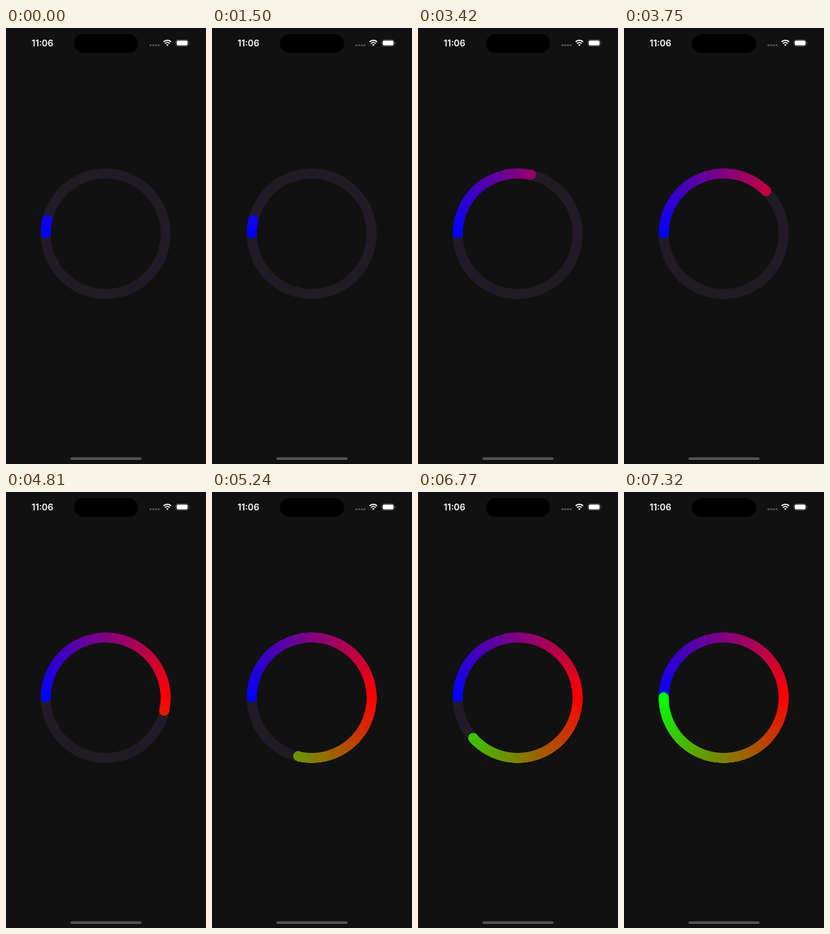
An HTML page that plays this animation: 295 px wide and 640 px high, repeating every 8530 ms.

```html
<!DOCTYPE html>
<html lang="en">
<head>
<meta charset="utf-8">
<title>Gradient progress ring</title>
<style>
  @property --p {
    syntax: "<number>";
    inherits: true;
    initial-value: 0.0357;
  }
  html, body {
    margin: 0;
    width: 100%;
    height: 100%;
    overflow: hidden;
    background: #111;
  }
  .stage {
    position: relative;
    width: 295px;
    height: 640px;
    overflow: hidden;
    background: #111;
  }
  .chrome {
    position: absolute;
    inset: 0;
  }
  .ring {
    position: absolute;
    left: 51px;
    top: 205.5px;
    width: 192px;
    height: 192px;
    --band: radial-gradient(circle closest-side, #0000 80.5px, #000 81.5px 95.5px, #0000 96px);
    animation: fill 8.53s cubic-bezier(.37, 0, .63, 1) infinite;
  }
  .track, .arc {
    position: absolute;
    inset: 0;
  }
  .track {
    background: #211b25;
    mask: var(--band);
  }
  .arc {
    background: conic-gradient(from 270deg, #00f, #f00, #0f0);
    mask: var(--band), conic-gradient(from 270deg, #000 calc(var(--p) * 100%), #0000 0);
    mask-composite: intersect;
  }
  .cap {
    position: absolute;
    left: 0;
    top: 88.5px;
    width: 15px;
    height: 15px;
    border-radius: 50%;
    background: #00f;
    transform-origin: 96px 7.5px;
  }
  .head {
    transform: rotate(calc(var(--p) * 360deg));
    background: rgb(
      calc(255 * min(2 * var(--p), 2 - 2 * var(--p)))
      calc(255 * max(0, 2 * var(--p) - 1))
      calc(255 * max(0, 1 - 2 * var(--p))));
  }
  /* quarter steps, the last one clipped at full */
  @keyframes fill {
    0%, 24.15% { --p: 0.0357; }
    27.67%, 42.53% { --p: 0.2857; }
    46.05%, 57.21% { --p: 0.5357; }
    60.73%, 77.73% { --p: 0.7857; }
    81.24%, 100% { --p: 1; }
  }
</style>
</head>
<body>
<div class="stage">
  <svg class="chrome" width="295" height="640" viewBox="0 0 295 640">
    <text x="53.7" y="26.6" fill="#fff" font-family="Inter, sans-serif" font-size="13" font-weight="600" text-anchor="middle">11:06</text>
    <rect x="100.5" y="9" width="94" height="27.5" rx="13.75" fill="#000"/>
    <g fill="#555">
      <circle cx="213" cy="25.3" r="1.5"/>
      <circle cx="217" cy="25.3" r="1.5"/>
      <circle cx="221" cy="25.3" r="1.5"/>
      <circle cx="225" cy="25.3" r="1.5"/>
    </g>
    <g fill="none" stroke="#fff" stroke-width="1.8">
      <path d="M232.5 20.4a7.9 7.9 0 0 1 11 0"/>
      <path d="M234.6 22.8a4.9 4.9 0 0 1 6.8 0"/>
    </g>
    <path d="M236.2 24.6a2.7 2.7 0 0 1 3.6 0l-1.8 2z" fill="#fff"/>
    <rect x="250.5" y="17.5" width="18.5" height="9" rx="3" fill="none" stroke="#666" stroke-width=".8"/>
    <rect x="251.8" y="18.6" width="16" height="6.8" rx="2" fill="#fff"/>
    <path d="M270 20.5q1.5 1.5 0 3z" fill="#666"/>
    <text x="148" y="432" fill="#14141f" font-family="Inter, sans-serif" font-size="11.5" text-anchor="middle">Animate</text>
    <rect x="95" y="630.3" width="105" height="3.8" rx="1.9" fill="#555"/>
  </svg>
  <div class="ring">
    <div class="track"></div>
    <div class="cap"></div>
    <div class="arc"></div>
    <div class="cap head"></div>
  </div>
</div>
</body>
</html>
```
